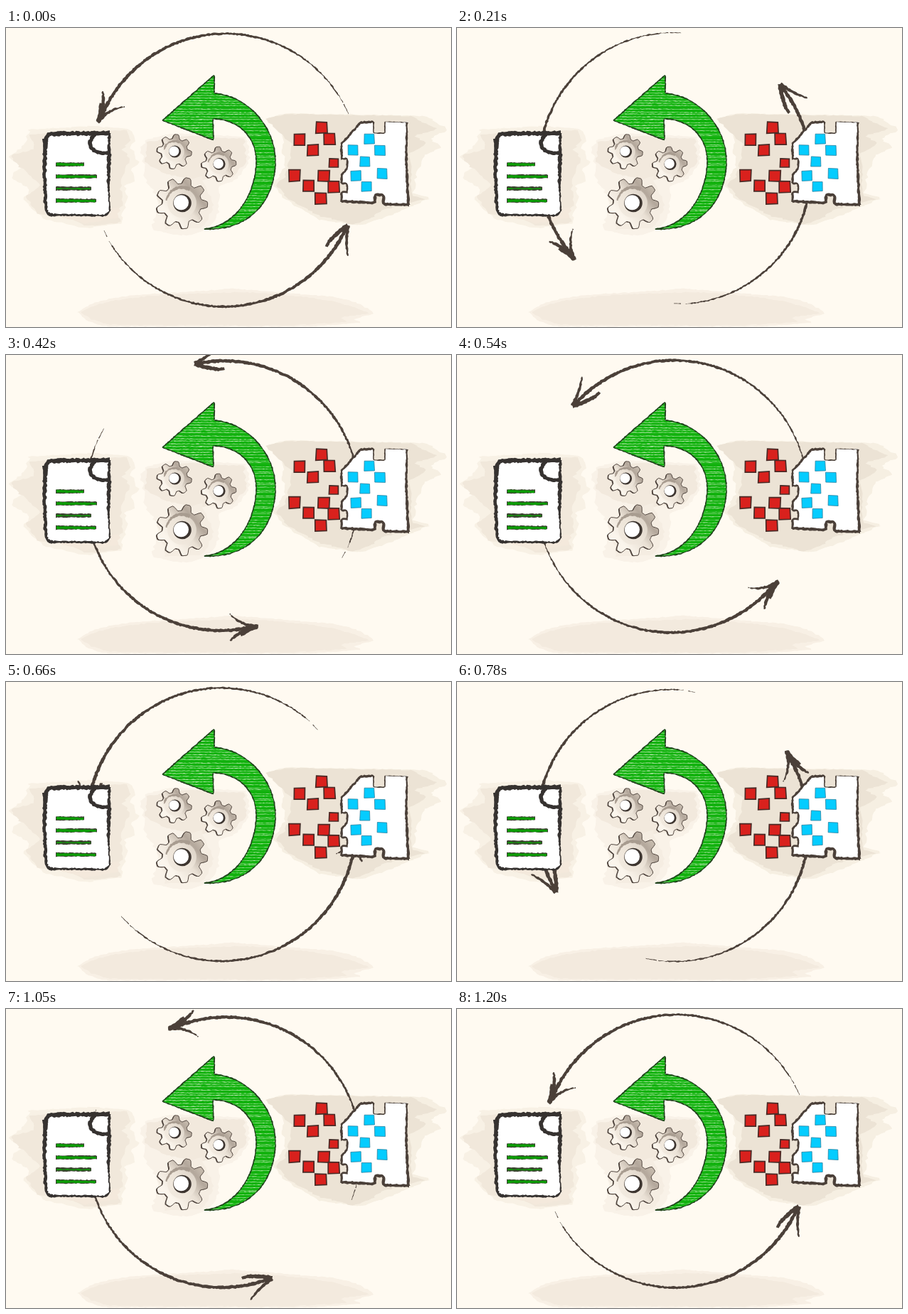
An HTML page that plays this animation: 626x421 px, repeating every 1.23 s.

```html
<!DOCTYPE html>
<html lang="en">
<head>
<meta charset="utf-8">
<title>Conversion cycle</title>
<style>
  html, body { margin: 0; width: 100%; height: 100%; overflow: hidden; background: #fffaf1; }
  svg { display: block; width: 626px; height: 421px; }
</style>
</head>
<body>
<svg id="stage" viewBox="0 0 626 421">
  <defs>
    <linearGradient id="metal" x1="0.1" y1="0.85" x2="0.85" y2="0.2">
      <stop offset="0.2" stop-color="#fbf5ec"/>
      <stop offset="0.55" stop-color="#e9e0d4"/>
      <stop offset="0.85" stop-color="#b3a79b"/>
      <stop offset="1" stop-color="#c4b9ac"/>
    </linearGradient>
    <clipPath id="swoosh"><path id="swooshShape"/></clipPath>
  </defs>
  <g id="back"></g>
  <g id="cycle"></g>
  <g id="front"></g>
</svg>
<script>
const $ = id => document.getElementById(id);
const back = $('back'), cycle = $('cycle'), front = $('front');
const INK = '#4b4039', BLACK = '#363230';

let seed = 7;
const random = () => (seed = seed * 16807 % 2147483647) / 2147483647;
const jitter = size => (random() - 0.5) * size;

function add(parent, d, attributes) {
  const path = document.createElementNS('http://www.w3.org/2000/svg', 'path');
  path.setAttribute('d', d);
  for (const key in attributes) path.setAttribute(key, attributes[key]);
  parent.append(path);
  return path;
}

const polygon = points => 'M' + points.map(p => p.map(v => v.toFixed(1)).join(' ')).join('L') + 'Z';

// A charcoal line along d whose width goes from start to end.
function brush(parent, d, start, end, fill = INK, rough = 1.3) {
  const guide = add(parent, d, { fill: 'none' });
  const length = guide.getTotalLength();
  const count = Math.ceil(length / 2.2);
  const left = [], right = [];
  for (let i = 0; i <= count; i++) {
    const s = i / count * length;
    const p = guide.getPointAtLength(s);
    const a = guide.getPointAtLength(Math.max(0, s - 1));
    const b = guide.getPointAtLength(Math.min(length, s + 1));
    const angle = Math.atan2(b.y - a.y, b.x - a.x);
    const width = start + (end - start) * (i / count) ** 0.7;
    const side = sign => {
      const r = sign * Math.max(0.15, width / 2 + jitter(rough));
      return [p.x - Math.sin(angle) * r, p.y + Math.cos(angle) * r];
    };
    left.push(side(1));
    right.unshift(side(-1));
  }
  guide.remove();
  add(parent, polygon(left.concat(right)), { fill });
}

// A washed patch with frayed sides.
function wash(d, fill, fray = 5) {
  const guide = add(back, d, { fill: 'none' });
  const length = guide.getTotalLength(), points = [];
  for (let s = 0; s < length; s += 4) {
    const p = guide.getPointAtLength(s);
    points.push([p.x + jitter(fray), p.y + jitter(1.5)]);
  }
  guide.remove();
  add(back, polygon(points), { fill });
}

function drawWashes() {
  wash('M33 143L120 138L172 142L182 155L176 170L186 188L178 200L180 216L168 222L172 240L160 275L110 282L50 268L25 240L34 226L6 210L22 196L3 181L25 165Z', '#f8f1e5');
  wash('M32 150L168 144L174 158L164 172L176 186L160 214L166 250L152 262L162 274L110 279L90 266L45 262L28 238L50 222L20 197L5 180L40 170Z', '#f1e8db');
  wash('M62 262L160 252L156 268L110 275Z', '#f4e9dc');

  wash('M368 126L400 120L590 124L622 143L596 156L614 168L585 182L572 232L597 240L545 262L500 278L440 270L394 242L376 220L392 196L388 150Z', '#f6efe2');
  wash('M366 128L396 121L570 124L606 142L575 152L592 163L568 176L570 235L590 241L530 256L516 266L490 277L440 264L396 240L380 222L394 208L404 165L384 146Z', '#ece3d5');

  wash('M190 168Q200 148 250 149L338 153L343 190L322 215L300 222L298 262Q285 292 245 292L205 284L214 240L196 214Z', '#f9f2e8');
  wash('M200 160L255 152L335 156L338 190L320 210L270 214L225 206L196 190Z', '#f2e9dd');
  wash('M212 234L275 208L292 250L276 282L225 284Z', '#f5ede2');

  wash('M101 400Q130 376 230 373L320 367L455 378Q500 384 518 402L490 410L500 415L430 420L140 420Q110 414 101 400Z', '#f8f0e5', 3);
  wash('M106 400Q135 380 240 375L330 372Q470 378 510 402L470 408L480 414L400 419L150 418Q115 412 106 400Z', '#f3eade', 3);
}

function drawCycle() {
  brush(cycle, 'M474 105A189 189 0 0 0 135 123', 0.8, 5);
  brush(cycle, 'M482 121L475 107', 0.5, 1, INK, 0.5);
  brush(cycle, 'M136 89Q139 108 130 132', 2, 7);
  brush(cycle, 'M135 106L130 132', 7, 4);
  brush(cycle, 'M167 111Q145 113 129 133', 1, 5);

  brush(cycle, 'M145 300A188 188 0 0 0 478 282', 0.8, 5);
  brush(cycle, 'M138 285L142 294', 0.5, 1, INK, 0.5);
  brush(cycle, 'M451 308Q456 294 481 278', 4, 6.5);
  brush(cycle, 'M481 321Q477 302 481 278', 1, 6);
}

function drawDocument() {
  add(front, 'M62 149H145V258Q144 264 138 264H62Q55 263 55 256V157Q55 150 62 149Z', { fill: '#fff' });
  brush(front, 'M56 160Q56 150 65 149L146 148', 6.5, 5.5, BLACK, 2);
  brush(front, 'M55 156L54 200L56 256Q58 263 66 263', 6.5, 4, BLACK, 2);
  brush(front, 'M60 263L138 264Q145 263 146 255', 4, 2.5, BLACK, 1.5);
  brush(front, 'M145 177L144 218', 5.5, 4, BLACK, 2);
  brush(front, 'M144 216L146 258', 3, 1.5, BLACK);
  brush(front, 'M145 148L145 178', 3.5, 4, BLACK, 1.6);
  brush(front, 'M128 148Q116 156 119 166Q123 178 146 176', 5, 5.5, BLACK, 1.6);
  [[192, 110], [209, 128], [226, 120], [243, 127]].forEach(([y, end], i) => {
    brush(front, `M70 ${y}L${end} ${y}`, 6, 5, '#3b4430', 1);
    brush(front, `M71 ${y}L${end - 1} ${y + 0.5}`, i == 2 ? 1.5 : 4, i == 2 ? 1.5 : 3, '#0c9c06', 1);
  });
}

function drawSwoosh() {
  const d = 'M220 130L293 66V92C340 95 379 140 379 187C379 245 340 287 278 283' +
    'C322 280 352 235 352 187C352 155 328 128 291 128L292 158Z';
  $('swooshShape').setAttribute('d', d);
  add(front, d, { fill: '#12b20e' });
  const hatch = document.createElementNS('http://www.w3.org/2000/svg', 'g');
  hatch.setAttribute('clip-path', 'url(#swoosh)');
  front.append(hatch);
  for (let y = 68; y < 288; y += 3.8) {
    const x = 216 + random() * 15;
    brush(hatch, `M${x} ${y + jitter(2)}L382 ${y + jitter(3) + 1}`, 0.9, 0.4, '#c4ebba', 0.7);
  }
  brush(front, d, 1.6, 1.6, '#20421c', 0.8);
}

function drawGear(x, y, radius, teeth, turn) {
  const points = [];
  for (let i = 0; i < 120; i++) {
    const a = i / 120 * 2 * Math.PI;
    const tooth = Math.max(-1, Math.min(1, 1.7 * Math.sin(teeth * a + turn)));
    const r = radius * (0.87 + 0.12 * tooth);
    points.push([x + r * Math.cos(a), y + r * Math.sin(a)]);
  }
  const d = polygon(points);
  const ring = (cx, cy, r) => `M${cx - r} ${cy}a${r} ${r} 0 1 0 ${2 * r} 0a${r} ${r} 0 1 0 ${-2 * r} 0Z`;
  add(front, d, { fill: '#463c36', transform: 'translate(-1.3 0.6)' });
  add(front, d, { fill: 'url(#metal)', stroke: '#51463f', 'stroke-width': 1 });
  add(front, ring(x, y, radius * 0.56), { fill: '#efe7dc', 'fill-opacity': 0.7 });
  brush(front, `M${x - radius * 0.6} ${y - radius * 0.1}A${radius * 0.6} ${radius * 0.6} 0 0 1 ${x + radius * 0.3} ${y - radius * 0.52}`,
    radius * 0.06, radius * 0.14, '#a89c90');
  add(front, ring(x + 0.5, y, radius * 0.35), { fill: '#3d3530' });
  add(front, ring(x - radius * 0.03, y - radius * 0.02, radius * 0.29), { fill: '#fff' });
}

function drawSquare(x, y, size, fill, ink, weight) {
  const h = size / 2;
  const corners = [[-h, -h], [h, -h], [h, h], [-h, h]];
  add(front, polygon(corners.map(([dx, dy]) => [x + dx + jitter(1.2), y + dy + jitter(1.2)])),
    { fill, stroke: ink, 'stroke-width': weight });
}

function drawPuzzle() {
  add(front, 'M499 133L517 132V148H533V132H565L563 185L567 249L531 248V235H519V246L472 244V231H480V219H472V207L480 198V184H472V163Z', { fill: '#fff' });
  brush(front, 'M472 184V163L499 133L517 132', 3, 3);
  brush(front, 'M517 132V148H533V132', 2, 1.5, INK, 0.8);
  brush(front, 'M533 132L565 133', 0.8, 0.8, INK, 0.6);
  brush(front, 'M564 133L563 185L566 249', 2.5, 4);
  brush(front, 'M567 249L531 248V235H519V246L472 244', 4, 4);
  brush(front, 'M472 245V231H480V219H472V207L480 198V184H471', 3, 2.5);

  const reds = [[444, 140], [413, 157], [455, 156], [432, 172], [461, 190, 12], [406, 208],
    [447, 208], [426, 222], [461, 224], [443, 240]];
  const blues = [[511, 156], [488, 172], [526, 172], [505, 188], [492, 208], [529, 205], [507, 223]];
  reds.forEach(([x, y, size = 15.5]) => drawSquare(x, y, size, '#d9211d', '#4a2a26', 1.7));
  blues.forEach(([x, y]) => drawSquare(x, y, 14, '#05ccff', '#2b7f9c', 0.8));
}

drawWashes();
drawCycle();
drawDocument();
drawSwoosh();
drawGear(237, 174, 24.5, 8, 0.6);
drawGear(299.5, 191.5, 24.5, 8, 2);
drawGear(247.5, 246.5, 36.5, 9, 1);
drawPuzzle();

function tick() {
  const step = Math.floor(performance.now() % 1230 / 30);
  cycle.setAttribute('transform', `rotate(${-9 * step} 305.4 200)`);
  requestAnimationFrame(tick);
}
tick();
</script>
</body>
</html>
```
